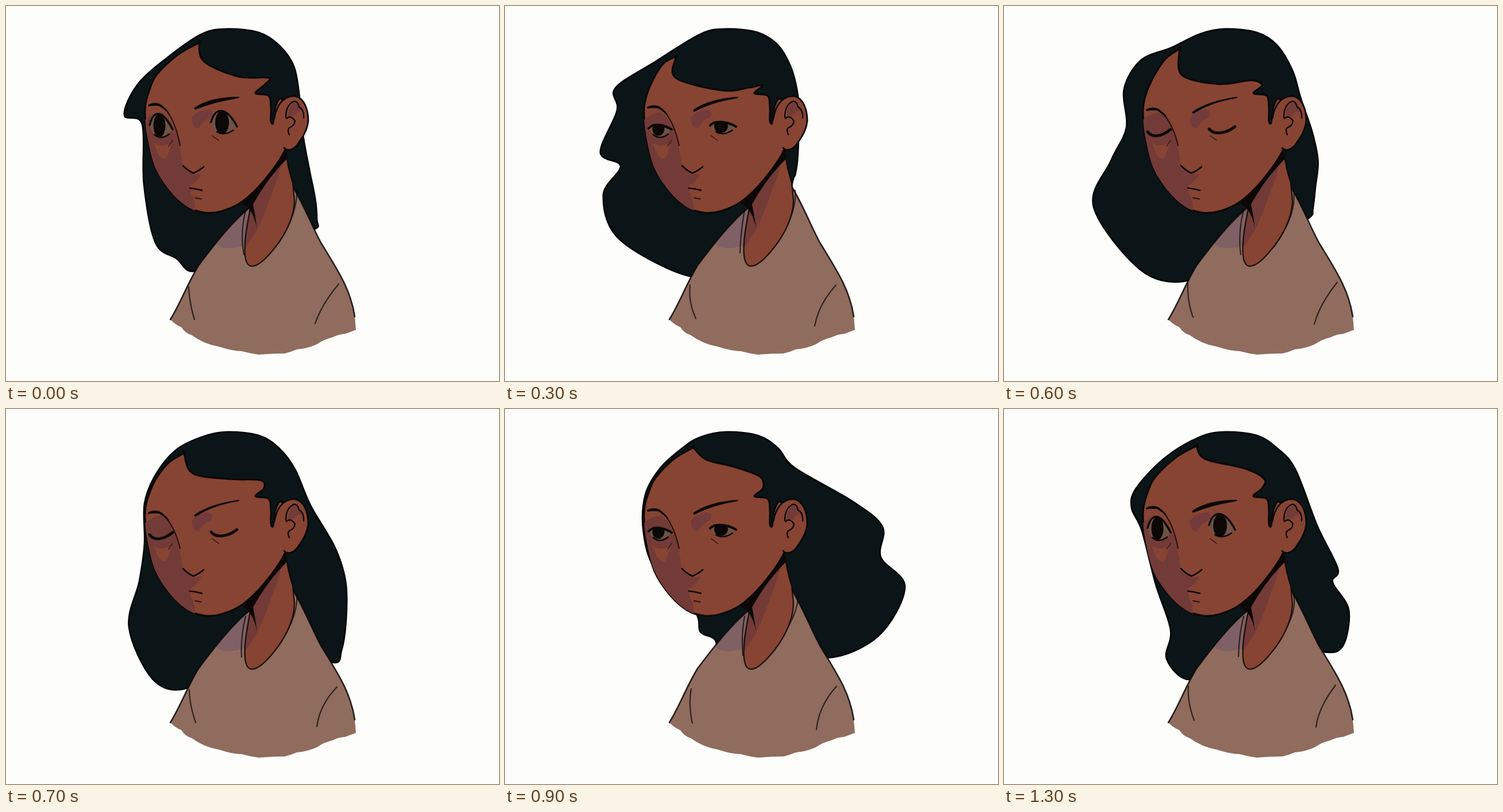
An HTML page for the animation above (1.4 s loop, 858 px wide and 653 px high).

```html
<!DOCTYPE html>
<html lang="en">
<head>
<meta charset="utf-8">
<title>Hair in the wind</title>
<style>
html, body { margin: 0; width: 100%; height: 100%; overflow: hidden; background: #fdfdfb; }
svg { display: block; width: 100%; height: 100%; }
path { stroke-linecap: round; stroke-linejoin: round; }
.ink { fill: none; stroke: #0c0807; }
.skin { fill: #874433; }
.shade { fill: #733b37; }
.dark { fill: #0c0807; }
</style>
</head>
<body>
<svg viewBox="0 0 858 653">
  <defs>
    <clipPath id="shirtClip"><use href="#shirt"/></clipPath>
    <clipPath id="neckClip"><use href="#neck"/></clipPath>
    <clipPath id="faceClip"><use href="#face"/></clipPath>
    <clipPath id="eyeClipL"><path id="eyeL"/></clipPath>
    <clipPath id="eyeClipR"><path id="eyeR"/></clipPath>
  </defs>

  <path id="hair" fill="#0b1517" stroke="#030506" stroke-width="2.8"/>

  <path id="shirt" fill="#8f6c5e" d="M425 350C395 374 365 412 335 452C315 485 305 515 286 546Q296 556 305 559Q312 570 323 573Q345 589 370 593Q395 601 410 601Q425 605 440 607Q465 605 485 605Q497 602 506 598Q526 596 541 589Q554 580 568 577Q580 571 590 571L609 564L607 541C600 492 574 455 548 412C532 382 520 350 500 316Z"/>
  <path fill="#7f6064" clip-path="url(#shirtClip)" d="M430 340L358 400L367 415Q381 428 418 416Z"/>
  <path class="ink" stroke-width="2.6" opacity=".85" d="M425 350C395 374 365 412 335 452C315 485 305 515 286 546M607 541C600 492 574 455 548 412C532 382 520 350 500 316"/>
  <path id="creases" class="ink" stroke-width="2.2" opacity=".72"/>

  <path id="neck" class="skin" d="M425 353C419 385 414 410 416 434Q418 453 428 453C447 453 478 410 488 390C500 366 502 350 502 338L499 308Q490 280 488 258L420 320Z"/>
  <path class="shade" clip-path="url(#neckClip)" d="M482 255Q479 290 464 322Q449 368 434 395L414 425L420 345Z"/>
  <path class="ink" stroke-width="2.4" opacity=".85" d="M425 353C419 385 414 410 416 434Q418 453 428 453C447 453 478 410 488 390C500 366 502 350 502 338L499 308Q490 280 488 258"/>
  <path class="dark" d="M408 341L450 300L487 249L489 266L476 280Q452 306 430 345Q434 365 437 388Q433 366 422 352Z"/>

  <path id="face" class="skin" stroke="#0c0807" stroke-width="3.2"/>
  <g clip-path="url(#faceClip)">
    <path class="shade" d="M235 205Q256 183 272 186Q288 196 298 228Q306 255 307 280L325 293L340 292Q337 302 320 313L322 328Q331 338 328 366L235 340Z"/>
    <path class="skin" d="M257 238Q271 248 288 238Q284 256 278 266Q270 266 264 256Z"/>
    <path fill="#733b3b" d="M323 195Q333 182 352 180Q363 183 357 193Q342 200 336 213Q324 213 323 195Z"/>
  </g>

  <path class="skin" stroke="#0c0807" stroke-width="2.8" d="M467 196C470 177 480 156 503 157C519 160 526 180 526 200C524 220 512 234 506 243C500 250 490 254 484 247"/>
  <path class="shade" d="M490 191Q491 174 502 167Q512 168 518 184Q508 181 503 190L497 193Z"/>
  <path class="ink" stroke-width="2.3" d="M487 194Q487 172 501 166Q508 165 510 176Q519 180 518 195M488 196Q495 189 503 200Q502 209 493 212Q489 216 493 224"/>

  <g clip-path="url(#eyeClipL)">
    <rect x="240" y="170" width="60" height="70" fill="#6e5345"/>
    <ellipse id="pupilL" cx="267" rx="10.5" class="dark"/>
  </g>
  <g clip-path="url(#eyeClipR)">
    <rect x="345" y="170" width="65" height="70" fill="#6e5345"/>
    <ellipse id="pupilR" cx="376" rx="12" class="dark"/>
  </g>
  <path id="lids" class="ink"/>
  <path id="lashes" class="ink" stroke-width="2.4" d="M258 224Q270 234 284 223M367 219Q380 227 396 216"/>
  <path class="ink" stroke-width="1.6" opacity=".6" d="M290 234L283 244M359 226L370 234"/>
  <path id="brows" class="dark"/>
  <path id="bridge" class="ink" stroke-width="2.2" opacity=".8"/>
  <path class="ink" stroke-width="2.7" d="M308 278Q317 287 326 291Q336 287 344 280"/>
  <path class="ink" stroke-width="2.6" d="M320 317Q330 318 341 321"/>
  <path class="ink" stroke-width="1.8" opacity=".8" d="M329 334L340 336"/>
</svg>
<script>
const STEP = 100, STEPS = 14;
const nums = s => s.match(/[\d.]+/g).map(Number);

// Key points of the wind: lock behind the ear, lock before the face, fringe up to the parting
const poses = [
  ['501,105 511,160 517,225 528,285 538,335 541,372 538,388', '325,462 297,440 260,412 240,310 237,206 206,190 228,138 278,92', '457,125 405,123 345,97 336,64'],
  ['497,105 508,145 512,185 511,230 509,268 505,294 500,308', '325,471 200,407 171,330 201,279 166,255 195,182 192,143 260,98', '425,142 378,147 297,125 298,88'],
  ['501,118 512,152 512,195 510,235 505,262 500,284 494,297', '322,462 225,433 119,318 151,240 183,193 179,130 215,80 285,76', '418,135 360,147 297,125 303,73'],
  ['503,105 530,168 572,240 591,300 592,365 584,420 568,441', '312,487 255,470 214,380 232,300 241,235 241,165 260,115 295,72', '443,124 390,122 325,112 310,77'],
  ['505,103 605,161 657,205 654,258 696,310 650,395 561,433', '365,401 340,388 330,352 262,280 241,215 244,150 270,103 310,67', '444,118 400,101 350,88 328,67'],
  ['522,122 580,176 638,193 668,240 689,290 650,378 555,429', '356,425 322,372 295,328 255,270 242,215 239,155 258,105 295,68', '436,97 405,87 360,77 330,66'],
  ['507,105 545,203 581,278 572,302 600,350 590,412 556,423', '322,471 283,435 290,385 264,305 240,212 222,172 230,138 280,85', '453,122 420,104 350,87 335,64']
].map(p => p.map(nums));
const poseStep = i => i ? 2 * i + 1 : 0;

const crown = nums('340,49 385,40 440,46 475,68');
const underShirt = nums('480,400 385,437');
const jaw = nums('242,190 246,228 260,282 288,325 318,351 347,360 376,357 412,340 450,303 485,252 500,200 480,162 469,175 465,203 461,200');
const sideburn = nums('461,175 457,156 434,152 449,138');

const $ = id => document.getElementById(id);
const draw = (id, d) => $(id).setAttribute('d', d);
const lerp = (a, b, u) => a + (b - a) * u;
const clamp = x => Math.min(1, Math.max(0, x));

function spline(a, b, c, d, u) {
  return b + u / 2 * (c - a + u * (2 * a - 5 * b + 4 * c - d + u * (3 * (b - c) + d - a)));
}

// Closed smooth curve through flat x, y pairs
function loop(v) {
  const n = v.length, at = i => v[(i + n) % n];
  let d = `M${v[0]} ${v[1]}`;
  for (let i = 0; i < n; i += 2) {
    const c = [];
    for (const k of [0, 1]) {
      const j = i + k;
      c[k] = at(j) + (at(j + 2) - at(j - 2)) / 6;
      c[k + 2] = at(j + 2) - (at(j + 4) - at(j)) / 6;
      c[k + 4] = at(j + 2);
    }
    d += 'C' + c.map(x => x.toFixed(1)).join(' ');
  }
  return d + 'Z';
}

function poseAt(step) {
  const n = poses.length;
  const i = poses.findLastIndex((_, k) => poseStep(k) <= step);
  const end = i + 1 < n ? poseStep(i + 1) : STEPS;
  const u = (step - poseStep(i)) / (end - poseStep(i));
  const [a, b, c, d] = [-1, 0, 1, 2].map(k => poses[(i + k + n) % n]);
  return b.map((part, p) => part.map((v, j) => spline(a[p][j], v, c[p][j], d[p][j], u)));
}

function drawHead([back, front, fringe]) {
  draw('hair', loop([...crown, ...back, ...underShirt, ...front]));
  const [px, py] = fringe.slice(-2);
  const temple = [lerp(px, 262, 0.45) - 4, lerp(py, 120, 0.45) - 4, 262, 120, 249, 148, 243, 170];
  draw('face', loop([...jaw, ...sideburn, ...fringe, px, py, ...temple]));
}

function drawEye(side, x0, x1, y, open) {
  const arch = lerp(y + 11, y - 38, open);
  const lid = `M${x0} ${lerp(y + 1, y - 11, open)}C${x0 + 7} ${arch} ${x1 - 18} ${arch} ${x1} ${y - 3}`;
  draw('eye' + side, open ? `${lid}Q${(x0 + x1) / 2 + 2} ${y + 19} ${x0 + 5} ${y + 3}Z` : '');
  $('pupil' + side).setAttribute('cy', lerp(y + 2, y - 10, open));
  $('pupil' + side).setAttribute('ry', lerp(4, 20, open));
  return lid;
}

function drawLook(open) {
  draw('lids', drawEye('L', 250, 290, 218, open) + drawEye('R', 357, 402, 213, open));
  $('lids').setAttribute('stroke-width', lerp(4.8, 3.4, open));
  $('lashes').setAttribute('opacity', open ? 1 : 0);

  const l = lerp(181, 173, open), r = lerp(184, 177, open);
  draw('brows', `M247 ${l - 1}Q264 ${l - 9} 275 ${l + 3}Q282 ${l + 8} 285 ${l + 16}Q274 ${l + 5} 266 ${l + 1}Q256 ${l} 248 ${l + 2}Z` +
    `M328 ${r}Q355 ${r - 19} 406 158Q407 160 402 161Q360 168 331 ${r + 3}Q326 ${r + 4} 328 ${r}Z`);
  draw('bridge', `M276 ${l + 6}Q294 ${l + 24} 303 243`);
}

// Hand-drawn folds that shift a little with each drawing
function drawCreases(step) {
  let seed = step + 1;
  const wobble = d => d.replace(/\d+/g, v => {
    seed = seed * 16807 % 2147483647;
    return +v + seed % 7 - 3;
  });
  draw('creases', wobble('M420 358Q408 395 411 430M507 322Q510 365 468 418M321 486Q322 515 329 545M578 484Q548 518 540 556'));
}

function drawStep(step) {
  drawHead(poseAt(step));
  drawLook(clamp((Math.abs(step - 6) - 1) / 4));
  drawCreases(step);
}

let shown = -1;
const start = performance.now();
function tick() {
  const step = Math.floor((performance.now() - start) / STEP) % STEPS;
  if (step !== shown) drawStep(shown = step);
  requestAnimationFrame(tick);
}
tick();
</script>
</body>
</html>
```
